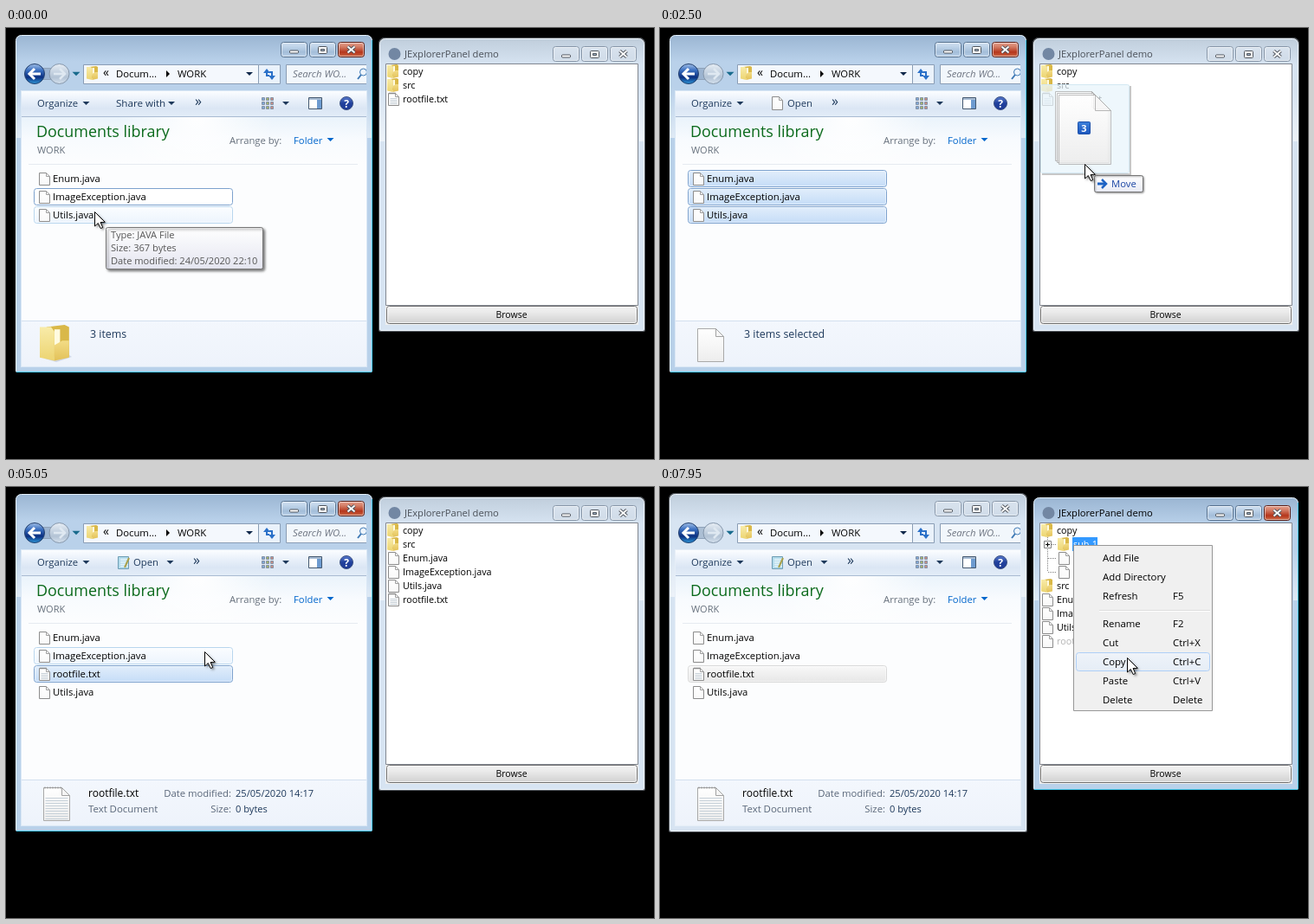
An HTML page with a canvas that plays this animation: 748 px wide and 498 px high, repeating every 8 s.

```html
<!DOCTYPE html>
<html lang="en">
<head>
<meta charset="utf-8">
<title>Drag and drop between file windows</title>
<style>
html, body { margin: 0; width: 100%; height: 100%; overflow: hidden; background: #000; }
canvas { display: block; }
</style>
</head>
<body>
<canvas id="stage" width="748" height="498"></canvas>
<script>
const ctx = document.getElementById('stage').getContext('2d');
const LOOP = 8000, STEP = 50;

// Cursor path: time, x, y
const PATH = [
  [50, 102, 212], [300, 92, 177], [450, 90, 174], [700, 91, 212], [900, 91, 212], [1200, 99, 178],
  [1549, 99, 178], [1550, 511, 170], [2400, 511, 170], [2500, 490, 157], [3350, 490, 157],
  [4150, 486, 134], [4550, 99, 249], [4850, 99, 249], [5450, 488, 72], [5700, 464, 51],
  [6050, 464, 51], [6500, 478, 67], [7200, 478, 67], [7550, 536, 184], [7850, 536, 185], [7950, 539, 197]
];
const MENU = [
  ['Add File', '', 82], ['Add Directory', '', 104], ['Refresh', 'F5', 126], ['Rename', 'F2', 158],
  ['Cut', 'Ctrl+X', 180], ['Copy', 'Ctrl+C', 202], ['Paste', 'Ctrl+V', 224], ['Delete', 'Delete', 246]
];

const between = (t, a, b) => t >= a && t < b;

function cursorAt(t) {
  const next = PATH.findIndex(p => p[0] > t);
  if (next === 0) return PATH[0].slice(1);
  if (next < 0) return PATH[PATH.length - 1].slice(1);
  const a = PATH[next - 1], b = PATH[next], k = (t - a[0]) / (b[0] - a[0]);
  return [1, 2].map(i => Math.round(a[i] + (b[i] - a[i]) * k));
}

function vertical(y, h, ...colors) {
  const g = ctx.createLinearGradient(0, y, 0, y + h);
  colors.forEach((c, i) => g.addColorStop(i / (colors.length - 1), c));
  return g;
}
function rect(x, y, w, h, fill) { ctx.fillStyle = fill; ctx.fillRect(x, y, w, h); }
function box(x, y, w, h, fill, stroke, radius = 0) {
  ctx.beginPath();
  ctx.roundRect(x + .5, y + .5, w - 1, h - 1, radius);
  if (fill) { ctx.fillStyle = fill; ctx.fill(); }
  if (stroke) { ctx.strokeStyle = stroke; ctx.stroke(); }
}
function poly(points, fill, stroke) {
  ctx.beginPath();
  points.forEach(p => ctx.lineTo(...p));
  ctx.closePath();
  if (fill) { ctx.fillStyle = fill; ctx.fill(); }
  if (stroke) { ctx.strokeStyle = stroke; ctx.stroke(); }
}
function line(points, color, width = 1) {
  ctx.beginPath();
  points.forEach(p => ctx.lineTo(...p));
  ctx.strokeStyle = color;
  ctx.lineWidth = width;
  ctx.stroke();
  ctx.lineWidth = 1;
}
function disc(x, y, r, fill, stroke) {
  ctx.beginPath();
  ctx.arc(x, y, r, 0, 7);
  ctx.fillStyle = fill;
  ctx.fill();
  if (stroke) { ctx.strokeStyle = stroke; ctx.stroke(); }
}
// y is the middle of the text line
function text(s, x, y, color = '#000', size = 11.3, align = 'left', style = '') {
  ctx.font = `${style} ${size}px "Open Sans", "Noto Sans", sans-serif`;
  ctx.textAlign = align;
  ctx.fillStyle = color;
  ctx.fillText(s, x, y + 4);
}
function withShadow(draw, alpha = .5, blur = 3, offset = 2) {
  ctx.save();
  ctx.shadowColor = `rgba(0,0,0,${alpha})`;
  ctx.shadowBlur = blur;
  ctx.shadowOffsetX = ctx.shadowOffsetY = offset;
  draw();
  ctx.restore();
}
const down = (x, y, color = '#1e395b', r = 4) =>
  poly([[x - r, y - r / 2], [x + r, y - r / 2], [x, y + r / 2]], color);

function folder(x, y, s = 1) {
  ctx.save();
  ctx.translate(x, y);
  ctx.scale(s, s);
  poly([[3, 1], [11, 0], [13, 1], [13, 14], [5, 14]], '#d9b848');
  poly([[6.5, 2], [9, 2], [9, 11], [6.5, 11]], '#fffbe0');
  poly([[0, 1], [5, 1], [6.5, 3], [6.5, 16], [0, 14.5]], vertical(1, 15, '#f8eba8', '#ecd471'));
  poly([[6.5, 9], [10, 7], [13, 7], [13, 14.5], [6.5, 16]], vertical(7, 9, '#f3dc86', '#e2c158'));
  ctx.restore();
}
function page(x, y, w, h, lined) {
  const large = w > 20, f = Math.round(w * .3), r = x + w - .5, b = y + h - .5;
  x += .5; y += .5;
  poly([[x, y], [r - f, y], [r, y + f], [r, b], [x, b]],
    vertical(y, h, '#fff', large ? '#ededed' : '#f8f8f8'), large ? '#a9a9a9' : '#8c8c8c');
  poly([[r - f, y], [r, y + f], [r - f, y + f]], '#f4f4f4', '#a2a2a2');
  if (!lined) return;
  const gap = large ? 3 : 2;
  for (let k = y + f + gap; k < b - 1; k += gap) line([[x + 2, k], [r - 2, k]], '#c6d0d8');
  for (let k = x + 1; k < r - f; k += gap) rect(k, y - 1, 1, 2, '#888');
}
const fileIcon = (x, mid, lined) => page(x, mid - 7, 13, 15, lined);

function captionButtons(x, y, active) {
  for (let i = 0; i < 3; i++) {
    const bx = x + 33 * i, red = active && i === 2;
    const fill = red ? vertical(y, 18, '#e9a896', '#d27a63', '#b5361c', '#d1714d')
      : active ? vertical(y, 18, '#d5e3f2', '#bdd2e8', '#a3bdd9', '#c0d5eb')
      : vertical(y, 18, '#d9e3ee', '#cfdbe8');
    box(bx, y, 31, 18, fill, red ? '#5c2018' : active ? '#56718f' : '#8796a8', 3);
    box(bx + 1, y + 1, 29, 16, null, 'rgba(255,255,255,.5)', 2);
    const cx = bx + 15.5, cy = y + 9;
    if (i === 0) box(cx - 5.5, cy + .5, 11, 4, '#fff', '#50565e', 1);
    if (i === 1) { box(cx - 5.5, cy - 4, 11, 9, '#fff', '#50565e', 1); box(cx - 2.5, cy - 1, 5, 3, '#9db0c4', '#50565e'); }
    if (i === 2) for (const [color, width] of [['#50565e', 3.8], ['#fff', 1.8]]) {
      line([[cx - 4, cy - 3.5], [cx + 4, cy + 3.5]], color, width);
      line([[cx - 4, cy + 3.5], [cx + 4, cy - 3.5]], color, width);
    }
  }
}

function windowFrame(x, y, w, h, active) {
  const radii = [6, 6, 1, 1], edge = active ? '#000' : '#50555b';
  box(x, y, w, h, edge, edge, radii);
  const fill = active ? vertical(y, 32, '#99b4d1', '#b9d1ea') : vertical(y, 32, '#bfcddb', '#d7e4f2');
  box(x + 1, y + 1, w - 2, h - 2, fill, active ? '#e6f2fc' : '#eef4fa', radii);
  // Glare that fades in down both sides and stops abruptly
  const glare = vertical(y + 60, 60, 'rgba(255,255,255,0)', 'rgba(255,255,255,.55)');
  rect(x + 2, y + 60, 5, 60, glare);
  rect(x + w - 7, y + 60, 5, 60, glare);
  if (active) {
    rect(x + w - 2, y + 7, 1, h - 9, '#45c8ea');
    rect(x + 2, y + h - 2, w - 4, 1, '#45c8ea');
  }
}

function navigation() {
  box(30, 46, 34, 14, 'rgba(120,145,175,.45)', '#8fa2b9');
  disc(33, 53, 11.5, vertical(41, 24, '#a9c5ea', '#3a6fc0', '#0b2f80', '#31a0e0'), '#23406e');
  line([[40, 53], [28, 53]], '#fff', 3);
  line([[33, 47], [27, 53], [33, 59]], '#fff', 3);
  disc(61.5, 53, 11.5, vertical(41, 24, '#eaf0f6', '#ccd8e5', '#b3c3d5', '#d8e4f0'), '#8496ab');
  line([[55, 53], [67, 53]], '#dfe8f1', 2.5);
  line([[62, 47], [68, 53], [62, 59]], '#dfe8f1', 2.5);
  down(81, 53, '#176a8c', 4.5);
  box(89, 42, 203, 23, '#f4f8fd', '#8a9db5');
  box(291, 42, 26, 23, '#eaf2fb', '#8a9db5');
  folder(93, 44);
  text('«', 112, 52, '#000', 14);
  text('Docum...', 127, 53);
  poly([[185, 49], [189, 53], [185, 57]], '#000');
  text('WORK', 198, 53);
  down(281, 53, '#10284a');
  poly([[297, 52], [301, 47], [305, 52]], '#2a70c8');
  line([[301, 51], [301, 55], [304, 55]], '#2a70c8', 2);
  poly([[303, 55], [307, 60], [311, 55]], '#2a70c8');
  line([[307, 56], [307, 51], [304, 51]], '#2a70c8', 2);
  ctx.save();
  ctx.beginPath();
  ctx.rect(320, 40, 96, 28);
  ctx.clip();
  box(323, 42, 110, 23, '#f2f7fc', '#8a9db5');
  text('Search WO...', 331, 53, '#6d7480', 11.3, 'left', 'italic');
  disc(412.5, 51, 4, '#eef5fc', '#3d78b4');
  line([[410, 54], [406, 59]], '#3d78b4', 2);
  ctx.restore();
}

function toolbar(selection) {
  const ink = '#1e395b';
  rect(18, 73, 398, 30, vertical(73, 30, '#fbfdff', '#eaf1fa', '#dbe6f4', '#e3edf8'));
  rect(18, 102, 398, 1, '#a9bbd2');
  text('Organize', 36, 87, ink);
  down(92.5, 87);
  if (selection) {
    if (selection.lined) {
      box(129, 80, 13, 15, '#b4dcec', '#6d9db4');
      for (let y = 83; y < 93; y += 2) rect(132, y, 9, 1, '#eef8fd');
      line([[142, 82], [137, 93]], '#a9a04a', 2);
    } else page(129, 79, 13, 16);
    text('Open', 147, 87, ink);
    if (selection.single) down(189.5, 87);
    text('»', selection.single ? 216 : 198, 86, ink, 16);
  } else {
    text('Share with', 127, 87, ink, 11.6);
    down(191, 87);
    text('»', 218, 86, ink, 16);
  }
  for (let i = 0; i < 9; i++) {
    const x = 295 + i % 3 * 5, y = 80 + (i / 3 | 0) * 5;
    box(x, y, 4, 4, ['#7fa8d8', '#a3b46c', '#c98f86'][i % 3], '#8592a5');
  }
  down(323, 87);
  box(349, 80, 16, 14, '#fff', '#44586f');
  rect(350, 81, 14, 2, '#a9bdd4');
  rect(359, 83, 5, 10, '#6d9bd0');
  disc(393, 87, 7.5, vertical(79, 16, '#5d7fd0', '#20409c', '#1c3a96'), '#3a4f82');
  text('?', 393, 87.5, '#fff', 12, 'center', 'bold');
}

function heading() {
  rect(18, 103, 398, 236, '#fcfdfe');
  rect(18, 103, 398, 54, vertical(103, 54, '#eaf3fb', '#f8fbfe', '#fcfdfe'));
  const glow = ctx.createRadialGradient(220, 100, 0, 220, 100, 90);
  glow.addColorStop(0, '#fff');
  glow.addColorStop(1, 'rgba(255,255,255,0)');
  rect(130, 103, 180, 50, glow);
  text('Documents library', 35, 122, '#0b6a1b', 17.9);
  text('WORK', 36, 141, '#66707c', 11);
  text('Arrange by:', 258, 130, '#66707c');
  text('Folder', 332, 130, '#0066cc');
  down(374.5, 129, '#0066cc');
  rect(26, 157, 380, 1, '#e6ebf1');
}

function fileRow(name, i, look) {
  const y = 164 + 21 * i;
  const styles = {
    selected: [vertical(y, 20, '#e2eefb', '#c4dcf7'), '#7da2ce'],
    faded: [vertical(y, 20, '#f9f9f9', '#e6e6e6'), '#d9d9d9'],
    hover: [vertical(y, 20, '#fbfdff', '#ecf4fd'), '#b8d6ee'],
    focus: ['#fff', '#7da2ce']
  };
  if (look) {
    box(32, y, 230, 20, ...styles[look], 3);
    if (look !== 'focus') box(33, y + 1, 228, 18, null, 'rgba(255,255,255,.45)', 2);
  }
  fileIcon(38, y + 10, name.endsWith('.txt'));
  text(name, 54, y + 10);
}

function details(selection) {
  const grey = '#5a6779', ink = '#1e395b';
  rect(18, 338, 398, 53, vertical(338, 53, '#f3f7fd', '#eef3fb'));
  rect(18, 338, 398, 1, '#d3e0ef');
  if (!selection) {
    poly([[45, 382], [64, 372], [76, 380], [58, 386]], 'rgba(90,100,130,.2)');
    folder(39, 343, 2.6);
    text('3 items', 97, 354, ink, 12.4);
    return;
  }
  page(43, 347, 31, 39, selection.lined);
  if (!selection.single) return text('3 items selected', 97, 354, ink, 12.4);
  const { name, type, date, size, column } = selection;
  text(name, 95, 354, '#000', 12);
  text(type, 95, 372, grey, 11.4);
  text('Date modified:', column, 354, grey, 11.3, 'right');
  text('Size:', column, 372, grey, 11.3, 'right');
  text(date, column + 5, 354, ink, 11.1);
  text(size, column + 5, 372, ink, 11.1);
}

function explorer(t, active, [mx, my]) {
  const moved = t >= 4900;
  const selection = t < 400 ? null
    : t < 850 ? { single: true, name: 'Enum.java', type: 'JAVA File', date: '24/05/2020 22:11', size: '61 bytes', column: 237 }
    : !moved ? { single: false }
    : { single: true, lined: true, name: 'rootfile.txt', type: 'Text Document', date: '25/05/2020 14:17', size: '0 bytes', column: 260 };
  windowFrame(10, 7, 414, 392, active);
  captionButtons(317, 16, active);
  navigation();
  rect(17, 72, 400, 320, active ? '#d9e7f5' : '#e6eef7');
  toolbar(selection);
  heading();
  const names = ['Enum.java', 'ImageException.java', 'Utils.java'];
  if (moved) names.splice(2, 0, 'rootfile.txt');
  names.forEach((name, i) => {
    const y = 164 + 21 * i;
    const chosen = selection && (selection.single ? name === selection.name : true);
    const hovered = active && mx > 31 && mx < 262 && my >= y && my < y + 21;
    const look = chosen ? (active ? 'selected' : 'faded') : hovered ? 'hover' : !selection && i === 1 ? 'focus' : '';
    fileRow(name, i, look);
  });
  details(selection);
}

function treeItem(name, row, { depth = 0, selected = false, color = '#000', plain = false } = {}) {
  const x = 440 + 19 * depth, y = 50 + 16 * row;
  if (name.includes('.')) fileIcon(x + 1, y, name.endsWith('.txt') && !plain);
  else folder(x, y - 8);
  if (selected) rect(x + 17, y - 8, name.length * 5.2 + 3, 16, '#3399ff');
  text(name, x + 18, y, selected ? '#fff' : color, 10.75);
}

function treeWindow(t, active) {
  windowFrame(430, 11, 308, 340, active);
  disc(448.5, 30, 7, '#7287a3');
  text('JExplorerPanel demo', 460, 30, active ? '#000' : '#4a5058', 11.2);
  captionButtons(631, 21, active);
  rect(438, 41, 292, 302, '#f0f0f0');
  box(438, 41, 292, 280, '#fff', '#828790');
  box(439, 321, 290, 21, vertical(321, 21, '#f3f3f3', '#ebebeb', '#dddddd', '#cfcfcf'), '#707070', 3);
  box(440, 322, 288, 19, null, 'rgba(255,255,255,.7)', 2);
  text('Browse', 583.5, 331, '#000', 10.5, 'center');

  const open = t >= 5950;
  let row = 0;
  treeItem('copy', row++, { selected: between(t, 5800, 6450) });
  if (open) {
    ctx.setLineDash([1, 1]);
    line([[447.5, 58], [447.5, 98]], '#808080');
    for (const y of [66.5, 82.5, 98.5]) line([[448, y], [458, y]], '#808080');
    ctx.setLineDash([]);
    box(443, 62, 9, 9, '#fff', '#848484');
    rect(445, 66, 5, 1, '#000');
    rect(447, 64, 1, 5, '#000');
    treeItem('sub-1', row++, { depth: 1, selected: t >= 6450 });
    treeItem('Enum.java', row++, { depth: 1 });
    treeItem('ImageException.java', row++, { depth: 1 });
  }
  treeItem('src', row++);
  if (t >= 3350) for (const name of ['Enum.java', 'ImageException.java', 'Utils.java']) treeItem(name, row++);
  treeItem('rootfile.txt', row, open ? { color: '#b4b4b4', plain: true } : {});
}

function tooltip() {
  withShadow(() => box(115, 230, 182, 49, vertical(230, 49, '#fff', '#e4e5f0'), '#767676', 2));
  ['Type: JAVA File', 'Size: 367 bytes', 'Date modified: 24/05/2020 22:10']
    .forEach((s, i) => text(s, 121, 239 + 15 * i, '#575757', 11.1));
}

function dragImage(x, y, copying) {
  rect(x + 52, y - 90, 2, 103, 'rgba(0,0,0,.22)');
  rect(x - 49, y + 11, 101, 2, 'rgba(0,0,0,.22)');
  box(x - 51, y - 92, 103, 103, 'rgba(232,244,251,.72)', '#d3e8f3', 2);
  ctx.save();
  ctx.globalAlpha = .75;
  for (const [dx, dy] of [[-34, -84], [-32, -82], [-30, -80]]) page(x + dx, y + dy, 61, 81);
  ctx.restore();
  box(x - 8, y - 49, 15, 15, vertical(y - 49, 15, '#3f82dc', '#1a55bd'), '#1c50aa', 1);
  text('3', x - .5, y - 41.5, '#fff', 11, 'center', 'bold');
  withShadow(() => box(x + 11, y + 13, copying ? 55 : 57, 20, vertical(y + 13, 20, '#fff', '#e8eaf4'), '#767676', 2), .35, 2, 1);
  if (copying) {
    rect(x + 16, y + 21, 10, 3, '#1d62c4');
    rect(x + 19.5, y + 17.5, 3, 10, '#1d62c4');
  } else {
    line([[x + 15, y + 23], [x + 25, y + 23]], '#1d62c4', 3);
    line([[x + 20, y + 18], [x + 25, y + 23], [x + 20, y + 28]], '#1d62c4', 2.5);
  }
  text(copying ? 'Copy' : 'Move', x + 31, y + 23, '#1c46a4', 11.3);
}

function popupMenu(mx, my) {
  box(477, 67, 161, 192, '#f0f0f0', '#979797');
  rect(507, 142, 128, 1, '#dcdcdc');
  rect(507, 143, 128, 1, '#fff');
  for (const [label, key, y] of MENU) {
    if (mx > 480 && my >= y - 11 && my < y + 11) box(480, y - 11, 155, 22, vertical(y - 11, 22, '#eff3f9', '#e5edf6'), '#aecff7', 3);
    text(label, 511, y, '#000', 11.4);
    text(key, 592, y, '#000', 11.4);
  }
}

function pointer(x, y, dragging) {
  const shape = [[0, 0], [0, 16.5], [3.8, 13], [6.7, 19], [9.2, 18], [6.6, 12], [11.8, 11.8]]
    .map(([dx, dy]) => [x + dx + .5, y + dy + .5]);
  withShadow(() => poly(shape, '#fff'), .5, 3, 2);
  poly(shape, '#fff', '#000');
  if (!dragging) return;
  rect(x + 4, y + 18, 13, 9, '#fff');
  ctx.setLineDash([1, 1]);
  box(x + 4, y + 18, 13, 9, null, '#000');
  box(x + 5, y + 19, 11, 7, null, '#000');
  ctx.setLineDash([]);
}

function draw(now) {
  const t = Math.floor(now % LOOP / STEP) * STEP;
  const [x, y] = cursorAt(t);
  const rightActive = between(t, 3350, 4750) || t >= 5800;
  rect(0, 0, 748, 498, '#000');
  explorer(t, !rightActive, [x, y]);
  treeWindow(t, rightActive);
  if (t < 50) tooltip();
  if (between(t, 1550, 2700)) dragImage(x, y, between(t, 1700, 1900) || between(t, 2200, 2450));
  if (t >= 7100) popupMenu(x, y);
  pointer(x, y, between(t, 4200, 4750));
}

const start = performance.now();
function tick() {
  draw(performance.now() - start);
  requestAnimationFrame(tick);
}
tick();
</script>
</body>
</html>
```
